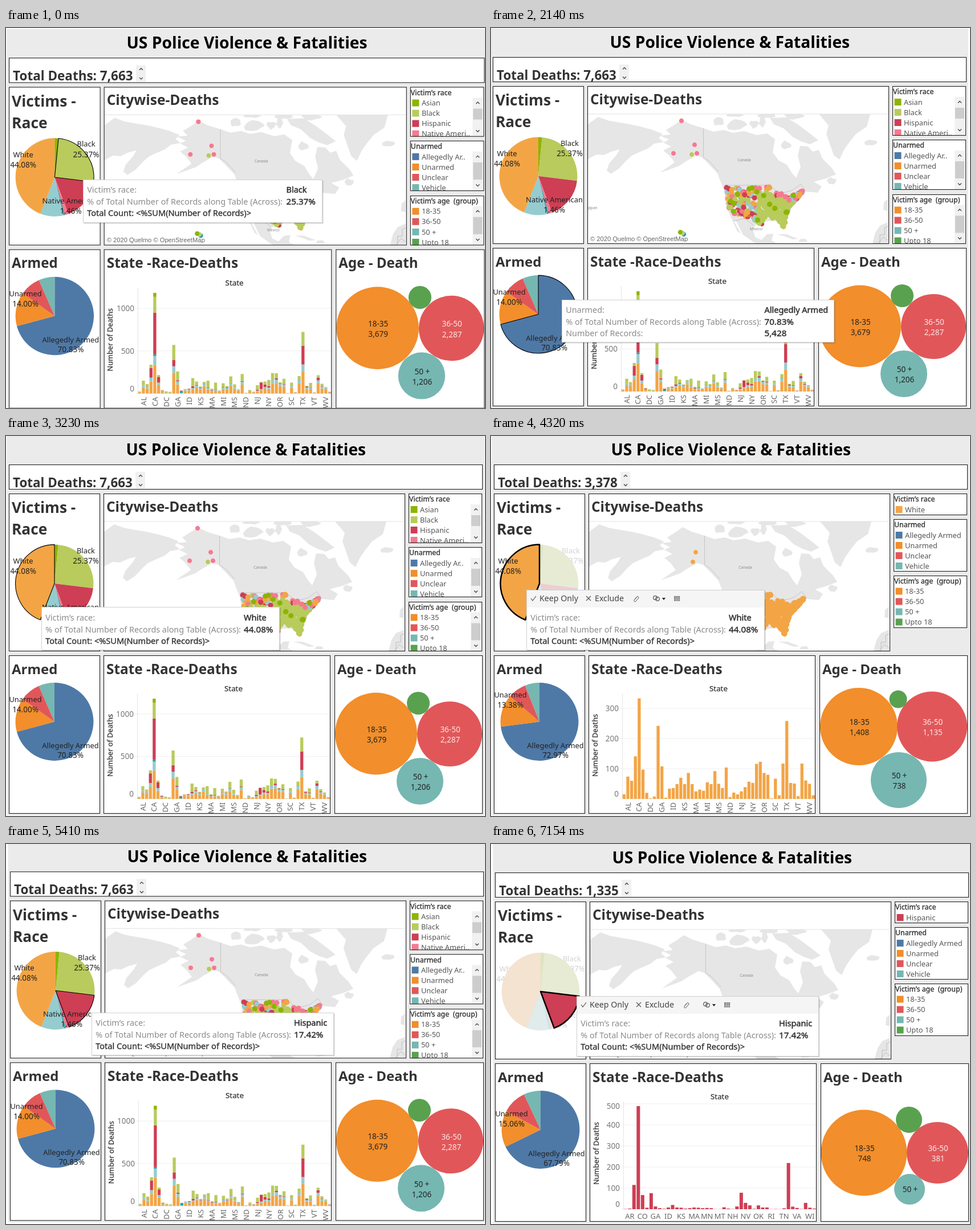
An HTML page for the animation above (7590 ms loop, 840 by 667 pixels).

```html
<!DOCTYPE html>
<html lang="en">
<head>
<meta charset="utf-8">
<title>US Police Violence &amp; Fatalities</title>
<style>
html, body { margin: 0; width: 100%; height: 100%; overflow: hidden; background: #fff; }
#stage { display: block; width: 840px; height: 667px; font-family: "Noto Sans", sans-serif; }
text { white-space: pre; }
.scene { visibility: hidden; animation: hold 7590ms step-end infinite; }
@keyframes hold { 0% { visibility: visible; } 14.3611%, 100% { visibility: hidden; } }
</style>
</head>
<body>
<svg id="stage" viewBox="0 0 840 667"></svg>
<script>
const LOOP = 7590;
const RACE = {
  Asian: '#8cb400', Black: '#b8cb5c', Hispanic: '#ce3e54', 'Native American': '#f47a90',
  Pacific: '#26a0a4', Unknown: '#95cccf', White: '#f3a546'
};
const SHARE = [1.55, 25.37, 17.42, 1.46, 0.6, 9.52, 44.08];
const ARMED = { 'Allegedly Armed': '#4e79a7', Unarmed: '#f28e2b', Unclear: '#e15759', Vehicle: '#76b7b2' };
const AGE = { '18-35': '#f28e2b', '36-50': '#e15759', '50 +': '#76b7b2', 'Upto 18': '#59a14f' };

// drawing helpers; text is placed by its vertical middle
const esc = s => String(s).replace(/&/g, '&amp;').replace(/</g, '&lt;');
const attrs = o => Object.entries(o).map(([k, v]) => ` ${k}="${v}"`).join('');
const text = (x, y, s, size = 12.9, o = {}) =>
  `<text${attrs({ x, y: (y + size * 0.36).toFixed(2), 'font-size': size, fill: '#222', ...o })}>${esc(s)}</text>`;
const mid = (x, y, s, size, o) => text(x, y, s, size, { 'text-anchor': 'middle', ...o });
const bold = (x, y, s, size, o) => text(x, y, s, size, { 'font-weight': 700, fill: '#333', ...o });
const medium = (w = 0.35) => ({ fill: '#333', stroke: '#333', 'stroke-width': w });
const rect = (x, y, w, h, fill, o = {}) => `<rect${attrs({ x, y, width: w, height: h, fill, ...o })}/>`;
const circle = (cx, cy, r, fill, o = {}) => `<circle${attrs({ cx, cy, r, fill, ...o })}/>`;
const path = (d, o) => `<path${attrs({ d, fill: 'none', ...o })}/>`;
const clip = (x, y, w, h, body) =>
  `<svg x="${x}" y="${y}" width="${w}" height="${h}" viewBox="${x} ${y} ${w} ${h}">${body}</svg>`;
const panel = (x, y, x2, y2, body = '') => rect(x, y, x2 - x, y2 - y, '#fff') + clip(x, y, x2 - x, y2 - y, body) +
  rect(x + .5, y + .5, x2 - x - 1, y2 - y - 1, 'none', { stroke: '#222', 'stroke-width': 1.1 });
const chevron = (x, y, dir) => path(`M${x - 3} ${y + 1.5 * dir}l3 ${-3 * dir}l3 ${3 * dir}`, { stroke: '#444', 'stroke-width': 1.3 });
const number = (x, y, s, o) => mid(x, y, s, 13.5, o);

function random(seed) {
  return () => (seed = (seed * 16807) % 2147483647) / 2147483647;
}

// pies
const R = 68.4;
function slice(cx, cy, from, to) {
  const at = p => {
    const a = p / 100 * 2 * Math.PI;
    return `${(cx + R * Math.sin(a)).toFixed(2)} ${(cy - R * Math.cos(a)).toFixed(2)}`;
  };
  return `M${cx} ${cy}L${at(from)}A${R} ${R} 0 ${to - from > 50 ? 1 : 0} 1 ${at(to)}Z`;
}

function pie(cx, cy, shares, colors, { hover, pick } = {}) {
  let from = 0, body = circle(cx, cy, R - 0.3, '#f2f2f2'), top = '';
  Object.entries(colors).forEach(([name, fill], i) => {
    const d = slice(cx, cy, from, from += shares[i]);
    body += path(d, { fill, opacity: pick && pick !== name ? 0.2 : 1 });
    if (name === pick || name === hover)
      top = path(d, { fill, stroke: '#000', 'stroke-width': name === pick ? 2.5 : 1.1, 'stroke-linejoin': 'round' });
  });
  return body + top;
}

function racePanel({ hover, pick }) {
  const labels = [['White', '44.08%', 30, 219], ['Black', '25.37%', 140, 201], ['Native American', '1.46%', 113, 300]];
  const write = (list, fill) => list.map(([a, b, x, y]) => mid(x, y, a, 12.9, { fill }) + number(x, y + 18, b, { fill })).join('');
  const lit = labels.filter(l => !pick || l[0] === pick);
  return bold(10, 126, 'Victims -', 26.3) + bold(10, 164, 'Race', 26.3) +
    write(labels.filter(l => !lit.includes(l)), '#d2d2d2') +
    pie(85, 259, SHARE, RACE, { hover, pick }) + write(lit, '#222');
}

function armedPanel({ armed, unarmedY, hover }) {
  return bold(10, 409, 'Armed', 24) + pie(85, 501.5, armed, ARMED, { hover }) +
    mid(113, 543, 'Allegedly Armed') + number(113, 560, armed[0].toFixed(2) + '%') +
    mid(34, unarmedY, 'Unarmed') + number(34, unarmedY + 18, armed[1].toFixed(2) + '%');
}

// map
const LAND = [
  'M172 168L190 155L206 161L222 164L246 168L264 172L286 178L303 185L296 192L305 199L288 202L278 210L262 217L249 223L239 232L226 246L212 255L205 249L209 237L222 222L228 212L213 216L200 222L187 221L172 229Z',
  'M336 160L352 168L375 175L392 181L410 178L426 183L446 180L468 187L486 184L500 194L496 217L506 231L521 239L530 254L537 262L545 243L540 223L544 206L558 207L566 216L577 213L583 228L600 245L607 256L590 263L568 269L582 277L575 288L553 286L545 298L531 309L527 322L513 333L518 350L513 351L505 338L490 338L470 341L461 352L465 366L476 371L486 361L497 360L494 372L510 380L470 380L444 362L432 338L428 338L440 360L434 356L421 328L413 308L411 285L405 270L399 254L385 239L372 226L362 223L353 228L344 233L332 241L316 247L298 253L324 235L314 222L304 214L318 207L304 200L314 195L299 188L317 186L309 178L325 168Z',
  'M491 157L520 156L541 169L561 184L576 196L561 203L546 198L531 190L515 175L498 168Z',
  'M577 150L667 150L661 172L642 185L630 200L621 213L613 230L603 222L597 205L590 185L594 170Z',
  'M504 361L520 361L541 369L531 370L515 364Z',
  'M698 340L684 346L676 358L671 377L698 377Z', 'M698 299L691 305L690 318L698 320Z'
];
const ISLANDS = [[402, 163, 10, 8], [432, 169, 18, 9], [463, 168, 8, 7], [478, 164, 6, 8], [486, 152, 16, 4],
  [430, 152, 14, 3], [518, 204, 9, 7], [599, 268, 8, 6], [667, 200, 10, 5], [549, 372, 7, 3], [535, 153, 18, 6]];

function blob([cx, cy, rx, ry], rnd) {
  const pts = Array.from({ length: 11 }, (_, i) => {
    const a = i / 11 * 2 * Math.PI, k = 0.75 + rnd() * 0.5;
    return `${(cx + rx * k * Math.cos(a)).toFixed(1)} ${(cy + ry * k * Math.sin(a)).toFixed(1)}`;
  });
  return `M${pts.join('L')}Z`;
}

const rndLand = random(11);
const land = path(LAND.join('') + ISLANDS.map(i => blob(i, rndLand)).join(''), { fill: '#e6e6e6' }) +
  path('M374.5 175V226L385 233L401 251M411 275H492M492 276L508 290L530 284L545 273L553 284M428 338L447 333L462 345', { stroke: '#bdbdbd', 'stroke-width': 0.8 }) +
  path('M672 377L684 377L684 362L692 362L692 350L698 347M681 377L690 366L698 372', { stroke: '#b5b5b5', 'stroke-width': 0.8 }) +
  ['Canada,446,231', 'Mexico,467,351.5', 'Japan,180,315'].map(l => {
    const [name, x, y] = l.split(',');
    return mid(+x, +y, name, 6.6, { fill: '#8a8a8a' });
  }).join('');

const NORTH = [[415, 279], [490, 278], [503, 287], [522, 294], [538, 291], [548, 285]];
const SOUTH = [[415, 297], [420, 320], [430, 328], [458, 331], [475, 345], [483, 335], [504, 333], [514, 348], [518, 347], [521, 324], [530, 308], [548, 287]];
function along(line, x) {
  const i = Math.max(1, line.findIndex(p => p[0] >= x));
  const [a, b] = [line[i - 1], line[i]];
  return a[1] + (b[1] - a[1]) * (x - a[0]) / (b[0] - a[0]);
}

const cities = (() => {
  const rnd = random(2020), list = [];
  const coast = ['Black', 'Hispanic', 'White', 'Unknown', 'Native American', 'Hispanic', 'Black', 'White'];
  const border = ['Native American', 'White', 'Native American', 'Unknown', 'Hispanic', 'White'];
  while (list.length < 440) {
    const x = 415 + rnd() * 133, n = along(NORTH, x), s = along(SOUTH, x), y = n + rnd() * (s - n);
    const east = x > 472 && y > n + 8, pick = rnd();
    if (!east && rnd() < 0.4 && y < 325) continue;
    const mix = x > 440 && y < n + 10 ? border : coast;
    const race = rnd() < (east ? 0.03 : 0.07) ? 'Asian' : east ? 'Black' : mix[Math.floor(pick * mix.length)];
    list.push({ x, y, race });
  }
  // the rarest group lies on top
  return list.sort((a, b) => (a.race === 'Asian') - (b.race === 'Asian'));
})();
const FAR = [[336, 162, 'Native American'], [359, 204, 'Native American White'], [322, 219, 'Native American'],
  [363, 219, 'Native American'], [354, 221, 'Black White'], [340, 361, 'Pacific'], [337, 358.5, 'Black'], [334, 357.5, 'Asian'],
  [477, 343, 'Hispanic Black'], [515, 348, 'White']];

function mapPanel({ pick }) {
  const shown = r => pick || Object.keys(RACE).find(name => r.startsWith(name));
  const far = FAR.filter(f => !pick || f[2].includes(pick))
    .map(([x, y, r]) => circle(x, y, 4.4, RACE[shown(r)], { stroke: '#fff', 'stroke-width': 0.5 }));
  const dots = cities.map(c => circle(c.x.toFixed(1), c.y.toFixed(1), 4.6, RACE[pick || c.race]));
  return bold(176, 124, 'Citywise-Deaths', 24.4) +
    clip(172, 150, 526, 227, land + far.join('') + dots.join('')) +
    path('M172 150H698', { stroke: '#e2e2e2' }) +
    text(176, 368.5, '© 2020 Quelmo © OpenStreetMap', 11.15, { 'font-family': 'Liberation Sans, Arial, sans-serif', fill: '#666' });
}

// bars
const STATES = ('AK AL AR AZ CA CO CT DC DE FL GA HI IA ID IL IN KS KY LA MA MD ME MI MN MO MS MT ' +
  'NC ND NE NH NJ NM NV NY OH OK OR PA RI SC SD TN TX UT VA VT WA WI WV WY').split(' ');
const without = (skip, values) => {
  const names = STATES.filter(s => !skip.includes(s));
  return Object.fromEntries(names.map((s, i) => [s, values[i]]));
};
const DEATHS = {
  White: without('', [15, 74, 60, 141, 333, 97, 20, 2, 8, 242, 108, 4, 34, 36, 49, 70, 49, 86, 49, 25, 31, 27, 55, 49, 92, 50,
    36, 104, 6, 21, 15, 25, 39, 57, 53, 116, 123, 86, 80, 2, 67, 12, 117, 258, 53, 51, 9, 117, 61, 50, 12]),
  Black: without('MT ND NH SD VT WY', [5, 52, 28, 31, 186, 21, 7, 23, 9, 169, 98, 1, 6, 1, 96, 40, 11, 19, 80, 15, 80, 1, 42,
    17, 74, 41, 77, 10, 51, 5, 35, 71, 80, 51, 9, 59, 3, 38, 41, 158, 9, 51, 25, 27, 10]),
  Hispanic: without('AK DC DE ME ND WV', [1, 3, 115, 489, 67, 7, 76, 13, 5, 2, 8, 20, 8, 7, 3, 5, 8, 7, 5, 6, 5, 0, 0, 9, 3, 1,
    13, 78, 30, 18, 2, 18, 8, 8, 0, 1, 0, 4, 219, 12, 6, 1, 30, 7, 3])
};
const AXIS = {
  all: { step: 500, ticks: 2, px: 0.149, base: 637 },
  Black: { step: 50, ticks: 3, px: 0.967, base: 640.5 },
  White: { step: 100, ticks: 3, px: 0.53, base: 637 },
  Hispanic: { step: 100, ticks: 5, px: 0.37, base: 641 }
};

function stack(s) {
  const { White: w, Black: b, Hispanic: h } = DEATHS;
  return [['White', w[s]], ['Unknown', w[s] * 0.32], ['Pacific', { CA: 20, HI: 24 }[s] || 0],
    ['Hispanic', h[s] || 0], ['Black', b[s] || 0], ['Asian', s === 'CA' ? 46 : w[s] > 100 ? 4 : 0]];
}

function barPanel({ pick }) {
  const { step, ticks, px, base } = AXIS[pick || 'all'];
  const names = pick ? Object.keys(DEATHS[pick]) : STATES;
  const gap = 338.5 / names.length, upright = names.length > 50;
  let out = bold(176, 409, 'State -Race-Deaths', 24.4) + mid(399, 443, 'State', 13.3, medium(0.25)) +
    mid(182, 543, 'Number of Deaths', 12.7, { transform: 'rotate(-90 182 543)', ...medium(0.25) });
  for (let i = 0; i <= ticks; i++) {
    const y = base - i * step * px;
    out += path(`M226 ${y}H569`, { stroke: '#efefef' }) +
      text(224, i ? Math.max(y, 460) : base - 8.5, i * step, 13.5, { 'text-anchor': 'end', fill: '#777' });
  }
  out += path(`M230.5 452V${base}`, { stroke: '#e4e4e4' });
  names.forEach((s, i) => {
    const x = 230 + gap * (i + 0.5);
    let y = base;
    for (const [race, n] of pick ? [[pick, Math.max(DEATHS[pick][s], 0.5)]] : stack(s)) {
      const h = n * px;
      y -= h;
      if (h) out += rect((x - gap * 0.4).toFixed(2), y.toFixed(2), (gap * 0.8).toFixed(2), h.toFixed(2), RACE[race]);
    }
    if (i % 3 !== 1) return;
    out += upright
      ? text(x, 643, s, 12.9, { 'text-anchor': 'end', fill: '#666', transform: `rotate(-90 ${x} 643)` })
      : mid(x, 653, s, 12.9, { fill: '#666' });
  });
  return out;
}

// bubbles
function agePanel({ bubbles }) {
  const colors = Object.entries(AGE);
  return bold(581, 409, 'Age - Death', 24) + bubbles.map(([x, y, r, n], i) => {
    const [name, fill] = colors[i], ink = { fill: i === 1 ? '#fbe6e6' : '#222' };
    const label = i === 3 ? '' : n ? number(x + 1, y - 7.5, name, ink) + number(x + 1, y + 10.5, n, ink) : number(x + 1, y, name, ink);
    return circle(x, y, r, fill) + label;
  }).join('');
}

// legends
function legend(title, items, y, bottom, head, scroll) {
  let body = text(707, y + head, title, 12.4, medium());
  items.forEach(([name, fill], i) => {
    const iy = y + head + 18 * (i + 1);
    const short = scroll && name.length > 12 ? name.slice(0, 12) + '..' : name;
    body += rect(709.5, iy - 6, 12, 12, fill) + text(726, iy, short, 12.8, { fill: '#555' });
  });
  if (scroll) {
    const sy = y + head + 9;
    body += rect(815, sy, 18, bottom - sy - 1, '#f1f1f1') + chevron(824, sy + 9, 1) +
      rect(816, sy + 19, 16, scroll, '#cdcdcd') + chevron(824, bottom - 10, -1);
  }
  return panel(706, y, 835, bottom, body);
}

function legends({ pick }) {
  const armed = Object.entries(ARMED), age = Object.entries(AGE), title = ['Victim’s race', 'Unarmed', 'Victim’s age  (group)'];
  return pick
    ? legend(title[0], [[pick, RACE[pick]]], 101, 139, 10) + legend(title[1], armed, 146, 238, 10) + legend(title[2], age, 245, 337, 9.5)
    : legend(title[0], Object.entries(RACE).slice(0, 4), 101, 188, 10, 19) +
      legend(title[1], armed, 195, 283, 10, 30) + legend(title[2], age, 291, 378, 9.5, 30);
}

// tooltip, in stage coordinates
function commands(x, y) {
  const line = { stroke: '#555', 'stroke-width': 1.2 };
  let grid = '';
  for (let i = 0; i < 12; i++) grid += rect(x + 259 + i % 3 * 3.6, y - 4 + Math.floor(i / 3) * 2.3, 3, 1.6, '#666');
  return path(`M${x + 8} ${y}l3 4l6 -8`, line) + text(x + 23, y, 'Keep Only', 14.2, { fill: '#444' }) +
    path(`M${x + 105} ${y - 4}l8 8m0 -8l-8 8`, line) + text(x + 120, y, 'Exclude', 14.2, { fill: '#444' }) +
    path(`M${x + 190} ${y + 2}l4 -5a2 2 0 0 1 3 2l-5 6a1.5 1.5 0 0 1 -3 -2l4 -5`, { ...line, 'stroke-width': 1 }) +
    circle(x + 226, y - 1, 3.3, 'none', line) + circle(x + 230, y + 1, 3.3, 'none', line) +
    path(`M${x + 238} ${y - 1}h6l-3 4Z`, { fill: '#222' }) + grid;
}

function tooltip({ pick, tip }) {
  const { x, y, w, h, row, value, lines } = tip;
  let out = rect(x + 1, y + 1, w, h, '#000', { opacity: 0.1 }) + rect(x + 2, y + 2, w, h, '#000', { opacity: 0.08 }) +
    rect(x + .5, y + .5, w - 1, h - 1, '#fff', { stroke: '#cfcfcf' });
  if (pick) out += rect(x + 1, y + 1, w - 2, 30, '#f5f5f5') + commands(x, y + 15);
  lines.forEach(([label, val], i) => {
    const ly = row + 20.4 * i;
    out += val
      ? text(x + 7.2, ly, label, 14.4, { fill: '#8a8a8a' }) + text(value, ly, val, /^\d/.test(val) ? 15.2 : 14.5, medium(0.5))
      : text(x + 7.2, ly, label, 14.55, medium());
  });
  return out;
}
const ACROSS = '% of Total Number of Records along Table (Across):';
const raceLines = (race, share) => [['Victim’s race:', race], [ACROSS, share], ['Total Count: <%SUM(Number of Records)>']];

// scenes
const all = {
  total: '7,663', armed: [70.83, 14, 8.6, 6.57], unarmedY: 462,
  bubbles: [[649, 522.5, 72, '3,679'], [778, 523, 57, '2,287'], [726, 606, 41, '1,206'], [723, 469, 20]]
};
const SCENES = [
  { ...all, move: [0, 2, 1.004], hover: 'Black',
    tip: { x: 135, y: 266, w: 420, h: 76, row: 284, value: 491.5, lines: raceLines('Black', '25.37%') } },
  { move: [-2, 1.8, 1.0012], pick: 'Black', total: '1,944', armed: [67.18, 17.28, 8.04, 7.5], unarmedY: 472.5,
    bubbles: [[655, 544.6, 78, '1,181'], [784, 544.6, 51, '488'], [739, 608.5, 27], [739, 484.7, 24.5]],
    tip: { x: 133, y: 235, w: 418, h: 105, row: 283, value: 488, lines: raceLines('Black', '25.37%') } },
  { ...all, move: [-2, 1, 1], hover: 'Allegedly Armed',
    tip: { x: 124, y: 477, w: 478, h: 75, row: 495, value: 479.5,
      lines: [['Unarmed:', 'Allegedly Armed'], [ACROSS, '70.83%'], ['Number of Records:', '5,428']] } },
  { ...all, move: [0, 0, 1], hover: 'White',
    tip: { x: 62, y: 300, w: 418, h: 76, row: 319, value: 417, lines: raceLines('White', '44.08%') } },
  { move: [0, 0, 1], pick: 'White', total: '3,378', armed: [72.97, 13.38, 7.65, 6], unarmedY: 454,
    bubbles: [[645, 510, 68, '1,408'], [773.5, 510, 61.5, '1,135'], [715, 604, 49, '738'], [714, 462, 15.5]],
    tip: { x: 62, y: 270, w: 418, h: 106, row: 319, value: 417, lines: raceLines('White', '44.08%') } },
  { ...all, move: [2, -1.7, 1], hover: 'Hispanic',
    tip: { x: 150, y: 296, w: 425, h: 75, row: 314, value: 505, lines: raceLines('Hispanic', '17.42%') } },
  { move: [2, 0, 1], pick: 'Hispanic', total: '1,335', armed: [67.79, 15.06, 10.15, 7], unarmedY: 473,
    bubbles: [[652, 542, 75.5, '748'], [781, 542, 54, '381'], [732, 606, 27], [731, 484, 23]],
    tip: { x: 150, y: 267, w: 425, h: 106, row: 315, value: 505, lines: raceLines('Hispanic', '17.42%') } }
];

function dashboard(sc) {
  const head = bold(12, 81.5, 'Total Deaths: ' + sc.total, 22.4) + rect(227, 63, 17, 29, '#f0f0f0') +
    chevron(236, 70, 1) + chevron(236, 86, -1);
  return rect(1.5, 0, 837.5, 666, '#ebebeb') +
    mid(420.8, 23.5, 'US Police Violence & Fatalities', 28.2, { 'font-weight': 700, fill: '#000' }) +
    panel(5, 50, 836, 94, head) +
    panel(5, 101, 165, 378, racePanel(sc)) + panel(171, 101, 700, 378, mapPanel(sc)) + legends(sc) +
    panel(5, 385, 165, 663, armedPanel(sc)) + panel(171, 385, 569, 663, barPanel(sc)) + panel(576, 385, 836, 663, agePanel(sc));
}

document.getElementById('stage').innerHTML = SCENES.map((sc, i) => {
  const start = i ? 1050 + 1090 * (i - 1) : 0;
  const [x, y, k] = sc.move;
  return `<g class="scene" style="animation-delay:${start - LOOP}ms">${rect(0, 0, 840, 667, '#fff')}` +
    `<g transform="translate(${x} ${y}) scale(${k})">${dashboard(sc)}</g>${tooltip(sc)}</g>`;
}).join('');
</script>
</body>
</html>
```
